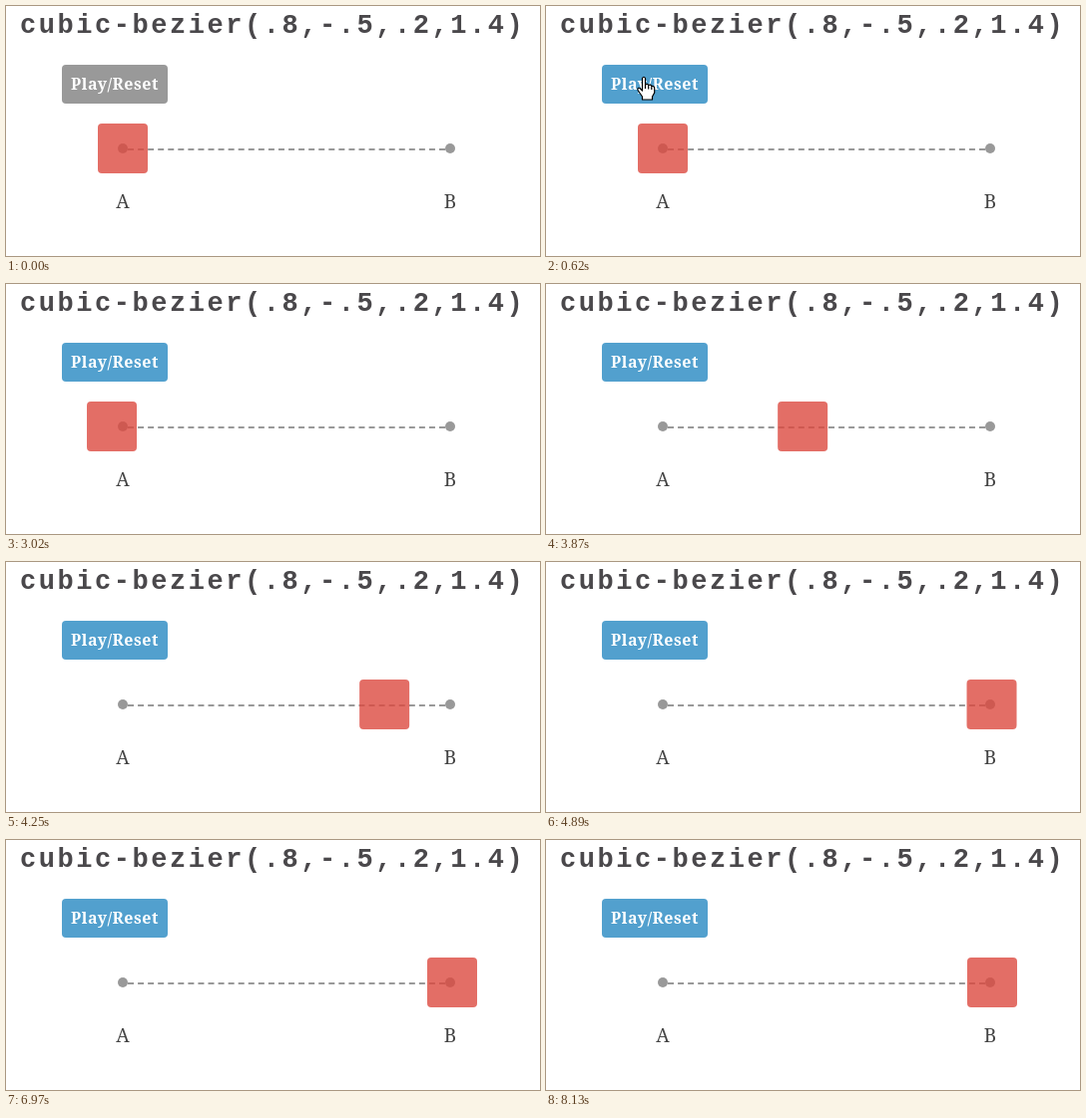
Animation, 535 px wide and 251 px high, one loop 8760 ms. Source, as an HTML page:

```html
<!DOCTYPE html>
<html lang="en">
<head>
<meta charset="utf-8">
<title>cubic-bezier</title>
<style>
  html, body { margin: 0; width: 100%; height: 100%; overflow: hidden; background: #fff; }
  #stage { position: relative; width: 535px; height: 251px; overflow: hidden; background: #fff; }
  #stage > * { position: absolute; }
  h1 {
    left: 14px; top: 5px; margin: 0; white-space: nowrap; color: #4a484b;
    font: bold 27px/30px "Liberation Mono", monospace; letter-spacing: 2.55px;
  }
  .button {
    left: 56px; top: 59px; width: 106px; height: 39px; border-radius: 4px;
    background: #999; color: #fff; text-align: center;
    font: 600 16px/39px "Noto Serif", serif; letter-spacing: .5px;
  }
  .button.hover { background: #52a0ce; }
  .line { left: 122px; top: 143px; width: 318px; border-top: 2px dashed #999; }
  .dot { top: 138px; width: 10px; height: 10px; border-radius: 50%; background: #999; }
  .label {
    top: 184px; width: 20px; text-align: center; color: #444;
    font: 300 19px/24px "Noto Serif", serif; font-stretch: extra-condensed;
  }
  .a { left: 112px; }
  .b { left: 440px; }
  .label.a { left: 107px; }
  .label.b { left: 435px; }
  #box {
    left: 92px; top: 118px; width: 50px; height: 50px; border-radius: 4px;
    background: rgba(221, 74, 64, .8);
  }
  #cursor { left: 0; top: 0; overflow: visible; }
  #cursor path { fill: #fff; stroke: #000; stroke-width: 1.2; stroke-linejoin: round; }
</style>
</head>
<body>
<div id="stage">
  <h1>cubic-bezier(.8,-.5,.2,1.4)</h1>
  <div class="button" id="button">Play/Reset</div>
  <div class="line"></div>
  <div class="dot a"></div>
  <div class="dot b"></div>
  <div class="label a">A</div>
  <div class="label b">B</div>
  <div id="box"></div>
  <svg id="cursor" width="20" height="26">
    <path id="arrow" d="M0 0V16L4 12.5L6.5 18.5L9 17.5L6.5 11.5H11.5Z"/>
    <g id="hand">
      <path d="M-1.5 1.5Q0 -1 1.5 1.5V8Q3.5 6.5 4.7 8.5Q6.6 7.3 7.8 9.5Q10.5 8.8 10.7 11.5V16L8.5 20V23H-1.5V20L-6 13.5Q-6.5 10.5 -4 11.5L-1.5 14Z"/>
      <path d="M1.5 8V12M4.7 8.5V12.5M7.8 9.5V13" style="fill:none"/>
    </g>
  </svg>
</div>
<script>
  const LOOP = 8760, STEP = 77.4, PHASE = 62;
  const MOVE = { start: 886, length: 6000, distance: 330 };
  const ENTER = { start: 62, end: 603, from: [400, 221], to: [98, 71] };
  const CURSOR_OFF = 2700;
  const $ = id => document.getElementById(id);
  const clamp = v => Math.min(1, Math.max(0, v));
  const show = (el, on) => { el.style.display = on ? "" : "none"; };

  const curve = (p, q, s) => 3 * (1 - s) ** 2 * s * p + 3 * (1 - s) * s * s * q + s ** 3;

  function bezier(x) {
    if (x <= 0 || x >= 1) return clamp(x);
    let lo = 0, hi = 1;
    for (let i = 0; i < 30; i++) {
      const mid = (lo + hi) / 2;
      if (curve(.8, .2, mid) < x) lo = mid; else hi = mid;
    }
    return curve(-.5, 1.4, lo);
  }

  function draw(time) {
    const t = PHASE + Math.floor((time - PHASE) / STEP) * STEP;

    const x = MOVE.distance * bezier((t - MOVE.start) / MOVE.length);
    $("box").style.transform = `translateX(${x.toFixed(2)}px)`;

    const p = clamp((t - ENTER.start) / (ENTER.end - ENTER.start));
    const ease = 1 - (1 - p) ** 2;
    const [cx, cy] = ENTER.from.map((v, i) => v + (ENTER.to[i] - v) * ease);
    const hover = cy < 98 && cx < 162;
    $("button").classList.toggle("hover", hover);
    show($("cursor"), t >= ENTER.start && t < CURSOR_OFF);
    show($("arrow"), !hover);
    show($("hand"), hover);
    $("cursor").style.transform = `translate(${Math.round(cx)}px, ${Math.round(cy)}px)`;
  }

  function frame() {
    draw(performance.now() % LOOP);
    requestAnimationFrame(frame);
  }
  frame();
</script>
</body>
</html>
```
